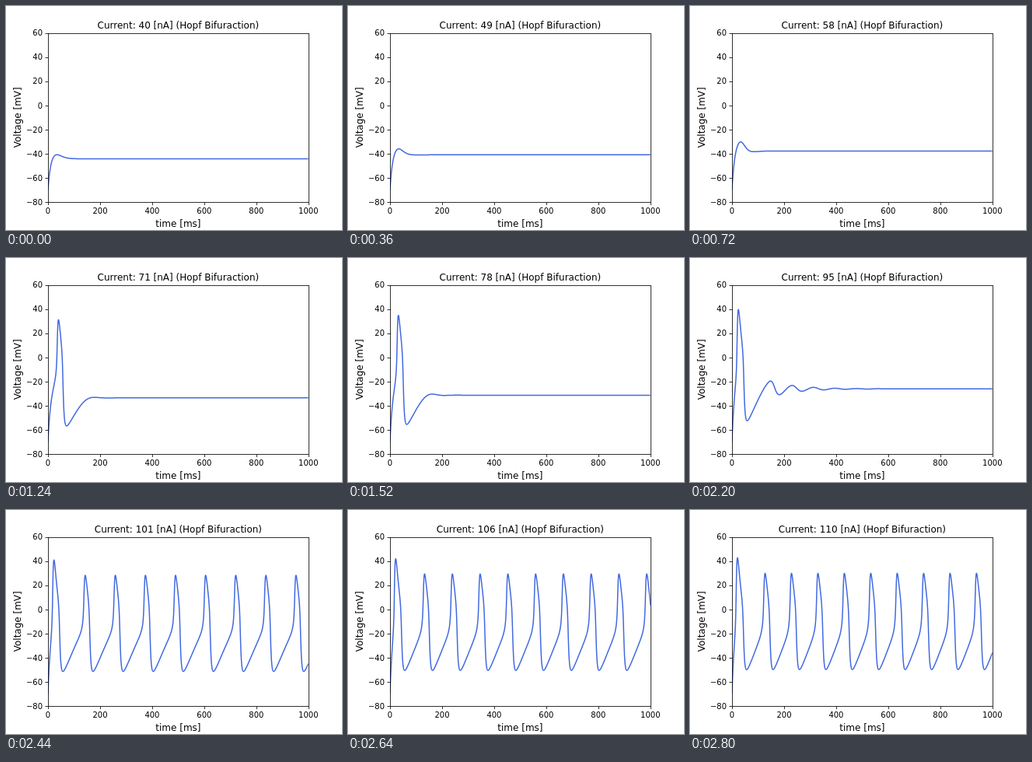
An HTML page with a canvas for the animation above (2.84 s loop, 432 by 288 pixels).

```html
<!DOCTYPE html>
<html lang="en">
<head>
<meta charset="utf-8">
<title>Hopf bifurcation</title>
<style>
  html, body { margin: 0; width: 432px; height: 288px; overflow: hidden; background: #fff; }
  canvas { display: block; }
</style>
</head>
<body>
<canvas id="stage" width="432" height="288"></canvas>
<script>
const ctx = document.getElementById('stage').getContext('2d');
const LEFT = 54, RIGHT = 388.8, TOP = 34.56, BOTTOM = 252;
const FIRST = 40, COUNT = 71, STEP_MS = 40;
const DT = 0.2, T_END = 1000;

const px = t => LEFT + t / T_END * (RIGHT - LEFT);
const py = v => BOTTOM - (v + 80) / 140 * (BOTTOM - TOP);
const snap = x => Math.round(x) + 0.5;

// Morris-Lecar neuron: membrane voltage v, potassium gate w
function slope(v, w, current) {
  const m = 0.5 * (1 + Math.tanh((v + 1.2) / 18));
  const wInf = 0.5 * (1 + Math.tanh((v - 2) / 30));
  const tau = Math.cosh((v - 2) / 60);
  return [
    (current - 2 * (v + 60) - 4 * m * (v - 120) - 8 * w * (v + 84)) / 20,
    0.04 * (wInf - w) / tau
  ];
}

function simulate(current) {
  const path = new Path2D();
  let v = -70, w = 0;
  path.moveTo(px(0), py(v));
  for (let i = 1; i <= T_END / DT; i++) {
    const [dv, dw] = slope(v, w, current);
    const [mv, mw] = slope(v + dv * DT / 2, w + dw * DT / 2, current);
    v += mv * DT;
    w += mw * DT;
    path.lineTo(px(i * DT), py(v));
  }
  return path;
}

const curves = Array.from({ length: COUNT }, (_, i) => simulate(FIRST + i));

function label(text, x, y, size, align = 'center') {
  ctx.font = `${size}px "DejaVu Sans", sans-serif`;
  ctx.textAlign = align;
  ctx.fillText(text, x, y);
}

function line(x1, y1, x2, y2) {
  ctx.beginPath();
  ctx.moveTo(x1, y1);
  ctx.lineTo(x2, y2);
  ctx.stroke();
}

function drawAxes() {
  const middle = (LEFT + RIGHT) / 2;
  ctx.strokeStyle = ctx.fillStyle = '#000';
  ctx.lineWidth = 0.8;
  ctx.strokeRect(snap(LEFT), snap(TOP), snap(RIGHT) - snap(LEFT), snap(BOTTOM) - snap(TOP));
  for (let t = 0; t <= 1000; t += 200) {
    const x = snap(px(t));
    line(x, 252.5, x, 256);
    label(t, px(t), 267, 10);
  }
  for (let v = -80; v <= 60; v += 20) {
    const y = snap(py(v));
    line(50.5, y, 54.5, y);
    label(String(v).replace('-', '\u2212'), 47, Math.round(py(v) + 3.8), 10, 'right');
  }
  label('time [ms]', middle, 284, 12);
  ctx.save();
  ctx.translate(19, (TOP + BOTTOM) / 2);
  ctx.rotate(-Math.PI / 2);
  label('Voltage [mV]', 0, 0, 12);
  ctx.restore();
}

function draw(now) {
  const index = Math.floor(now / STEP_MS) % COUNT;
  ctx.fillStyle = '#fff';
  ctx.fillRect(0, 0, 432, 288);

  ctx.save();
  ctx.beginPath();
  ctx.rect(LEFT, TOP, RIGHT - LEFT, BOTTOM - TOP);
  ctx.clip();
  ctx.strokeStyle = 'royalblue';
  ctx.lineWidth = 1.5;
  ctx.lineJoin = 'round';
  ctx.stroke(curves[index]);
  ctx.restore();

  drawAxes();
  label(`Current: ${FIRST + index} [nA] (Hopf Bifuraction)`, (LEFT + RIGHT) / 2, 29, 12);
}

let start;
function tick(now) {
  start ??= now;
  draw(now - start);
  requestAnimationFrame(tick);
}
draw(0);
requestAnimationFrame(tick);
</script>
</body>
</html>
```
